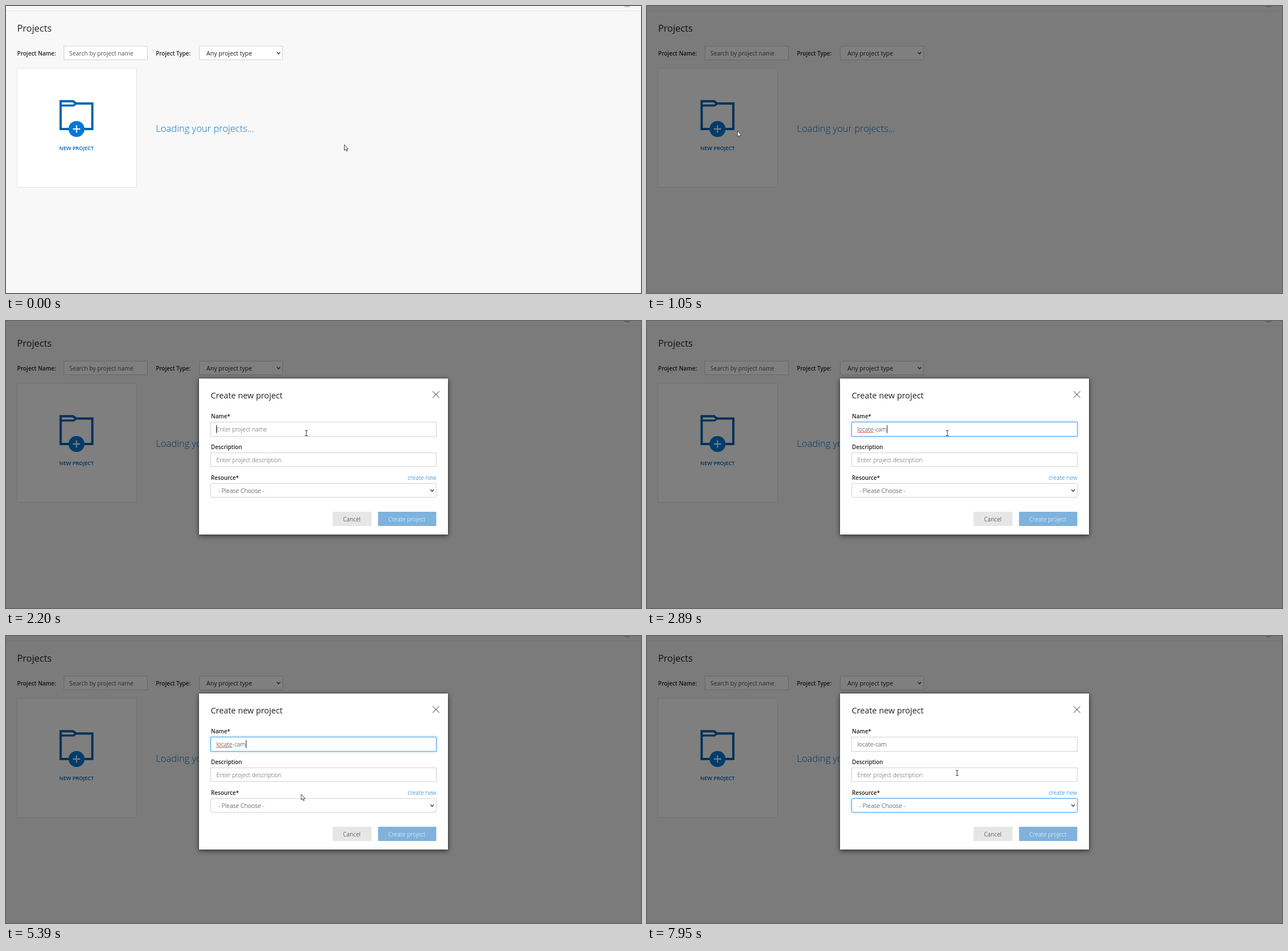
An HTML page for the animation above (7990 ms loop, 1112x504 px).

```html
<!DOCTYPE html>
<html lang="en">
<head>
<meta charset="utf-8">
<title>Create new project</title>
<style>
  html, body { margin: 0; width: 100%; height: 100%; overflow: hidden; background: #f8f8f8; }
  svg { display: block; width: 1112px; height: 504px; }
  text { font-family: "Open Sans", "Noto Sans", sans-serif; font-size: 10.25px; font-weight: 300; fill: #222; white-space: pre; }
  .label { font-size: 9.8px; font-weight: 600; fill: #222; }
  .body { font-weight: 400; }
  .hint { fill: #555; }
  .field { fill: #fff; stroke: #d2d2d2; }
  .focus { fill: #fff; stroke: #4ba3ea; filter: drop-shadow(0 0 2.5px rgba(70, 165, 235, .5)); }
  .chevron { fill: none; stroke: #333; stroke-width: 1.3; }
  #hover { fill: #fff; filter: drop-shadow(0 5px 5px rgba(0, 0, 0, .17)); }
  #panel { fill: #fff; filter: drop-shadow(0 0 1px rgba(0, 0, 0, .45)) drop-shadow(0 2px 4px rgba(0, 0, 0, .6)); }
</style>
</head>
<body>
<svg viewBox="0 0 1112 504">
  <defs>
    <clipPath id="cardArea"><path d="M19 109H260V350H19z"/></clipPath>
  </defs>

  <rect width="1112" height="504" fill="#f8f8f8"/>
  <path d="M0 8.5H1112" stroke="#e6e6e6"/>
  <circle cx="1088" cy="-8" r="10.5" fill="#c4c4c4"/>
  <text class="body" x="19.5" y="45" style="font-size:16.3px">Projects</text>

  <text class="label" x="19.5" y="87" style="font-size:10px">Project Name:</text>
  <rect class="field" x="101.5" y="70.5" width="146" height="24"/>
  <text class="body hint" x="111" y="86.5">Search by project name</text>
  <text class="label" x="262.5" y="87">Project Type:</text>
  <rect class="field" x="338.5" y="70.5" width="146" height="24" rx="2"/>
  <text class="body" x="351" y="86.5" style="font-size:10.6px">Any project type</text>
  <path class="chevron" d="M474.5 81l2.8 3 2.8-3"/>

  <g clip-path="url(#cardArea)"><rect id="hover" x="19.5" y="109.5" width="209" height="209"/></g>
  <rect x="19.5" y="109.5" width="209" height="209" fill="#fff" stroke="#e6e6e6"/>
  <g fill="none" stroke="#0063b1" stroke-width="4">
    <path d="M95.7 167.3H117.5L122.5 171.2H151.2V216H95.7z"/>
    <path d="M95.7 174.8H118.5L122.5 171.2" stroke-width="3.4"/>
  </g>
  <circle cx="123.5" cy="216" r="14" fill="#0078d7"/>
  <path d="M117 216h13M123.5 209.5v13" stroke="#fff" stroke-width="2"/>
  <text x="123.5" y="253.2" text-anchor="middle" style="font-size:9.1px;font-weight:600;fill:#0063b1">NEW PROJECT</text>
  <text x="262.5" y="221" style="font-size:16.5px;fill:#0072c6">Loading your projects...</text>

  <rect id="shade" width="1112" height="504" opacity=".5"/>

  <g id="modal">
    <rect id="panel" x="338" y="101" width="436" height="274"/>
    <text class="body" x="358.5" y="136" style="font-size:14.4px">Create new project</text>
    <path d="M747 123.3l11.6 11.6M758.6 123.3L747 134.9" stroke="#333"/>

    <text class="label" x="359" y="171">Name*</text>
    <rect class="field" x="358.5" y="177.5" width="395" height="25"/>
    <rect class="focus" id="nameFocus" x="358.5" y="177.5" width="395" height="25"/>
    <text class="hint" id="nameHint" x="368.5" y="194">Enter project name</text>
    <text id="nameText" x="368.5" y="194" style="font-size:10.4px">locate-cam</text>
    <path id="spell" d="M368.5 195.5H396.5" stroke="#e0483e"/>
    <path id="caret" d="M0 183V197" stroke="#222"/>

    <text class="label" x="359" y="224.5">Description</text>
    <rect class="field" x="358.5" y="231.5" width="395" height="24"/>
    <text class="hint" x="368.5" y="248">Enter project description</text>

    <text class="label" x="359" y="278.5">Resource*</text>
    <text x="753.5" y="278.5" text-anchor="end" style="fill:#006cc4">create new</text>
    <rect class="field" x="358.5" y="285.5" width="395" height="24" rx="2"/>
    <rect class="focus" id="listFocus" x="358.5" y="285.5" width="395" height="24" rx="2"/>
    <text x="371.5" y="302" style="font-size:10.5px">- Please Choose -</text>
    <path class="chevron" d="M743.3 296l2.9 3.2 2.9-3.2"/>

    <rect x="572" y="335" width="68" height="25" fill="#e6e6e6"/>
    <text x="605.5" y="352" text-anchor="middle">Cancel</text>
    <rect x="651.5" y="335" width="102" height="25" fill="#7fb2dc"/>
    <text x="702" y="352" text-anchor="middle" style="fill:#fff">Create project</text>

    <g id="list">
      <path d="M359 310H753.5V325.5H359z" fill="#c0c0c0"/>
      <path d="M359.5 325.5V310.5H753.5V325.5" fill="none" stroke="#777"/>
      <text x="371.5" y="321.7" style="font-size:10.5px;fill:#fff">- Please Choose -</text>
    </g>
  </g>

  <g id="cursor" stroke-linejoin="round">
    <path id="arrow" d="M0 0V10l2.3-2 1.6 3.4 1.5-.7-1.5-3.2h2.9z" fill="#fff" stroke="#333" stroke-width=".9"/>
    <path id="hand" d="M-1.5 8V1a1.3 1.3 0 0 1 2.6 0v4l4 .9q1.4.4 1.3 1.8l-.4 3.3-1.2 3h-5l-3.8-5.2q-.3-1.6 1.2-1.2z" fill="#fff" stroke="#333" stroke-width=".9"/>
    <path id="beam" d="M-2.5-4.5h5M0-4.5v9M-2.5 4.5h5" fill="none" stroke="#333"/>
  </g>
</svg>

<script>
  const LOOP = 7990;
  const $ = id => document.getElementById(id);
  const clamp = v => Math.min(1, Math.max(0, v));
  const ramp = (t, from, to) => clamp((t - from) / (to - from));
  const ease = k => k * k * (3 - 2 * k);
  const show = (id, on) => $(id).setAttribute('visibility', on ? 'inherit' : 'hidden');
  const fade = (id, v) => $(id).setAttribute('opacity', v);

  // start, end, target x, target y, sideways bulge
  const moves = [
    [150, 610, 158.5, 219.5, 0],
    [1180, 1750, 526, 197, 0],
    [3360, 3690, 515.5, 242.5, 0],
    [5120, 5510, 514.5, 288, 3.5],
    [7360, 7950, 543, 240.5, 0]
  ];

  // start, end, x of each visible caret phase
  const carets = [
    [1300, 2730, 368.5], [2890, 3390, 420.5], [3890, 4440, 420.5],
    [4930, 5450, 420.5], [5990, 6260, 420.5]
  ];

  function pointer(t) {
    let x = 592.5, y = 243.5;
    for (const [from, to, tx, ty, bulge] of moves) {
      if (t < from) break;
      const k = ease(ramp(t, from, to));
      x += (tx - x) * k + bulge * Math.sin(Math.PI * k);
      y += (ty - y) * k;
    }
    return [x, y];
  }

  function cursorShape(t, x, y) {
    if (t < 1050) return x < 229 ? 'hand' : 'arrow';
    const inField = x > 358 && ((y > 177 && y < 203) || (y > 231 && y < 256));
    return t > 1250 && inField ? 'beam' : 'arrow';
  }

  function draw(t) {
    const open = ease(ramp(t, 1140, 1340));
    fade('hover', t < 1050 ? ramp(t, 390, 620) : 0);
    show('shade', t >= 1050);
    show('modal', t >= 1140);
    fade('modal', open);
    $('modal').setAttribute('transform', `translate(0 ${-68 * (1 - open)})`);

    const typed = t >= 2890;
    const leave = ramp(t, 6250, 6400);
    fade('nameFocus', ramp(t, 2200, 2340) * (1 - leave));
    fade('listFocus', leave);
    show('nameHint', !typed);
    show('nameText', typed);
    show('spell', typed && t < 6260);
    show('list', t >= 6290 && t < 7130);

    const caret = carets.find(([from, to]) => t >= from && t < to);
    show('caret', !!caret);
    if (caret) $('caret').setAttribute('transform', `translate(${caret[2]} 0)`);

    const [x, y] = pointer(t);
    const shape = cursorShape(t, x, y);
    for (const id of ['arrow', 'hand', 'beam']) show(id, id === shape);
    $('cursor').setAttribute('transform', `translate(${x.toFixed(1)} ${y.toFixed(1)})`);
  }

  const start = performance.now();
  function tick() {
    draw((performance.now() - start) % LOOP);
    requestAnimationFrame(tick);
  }
  tick();
</script>
</body>
</html>
```
